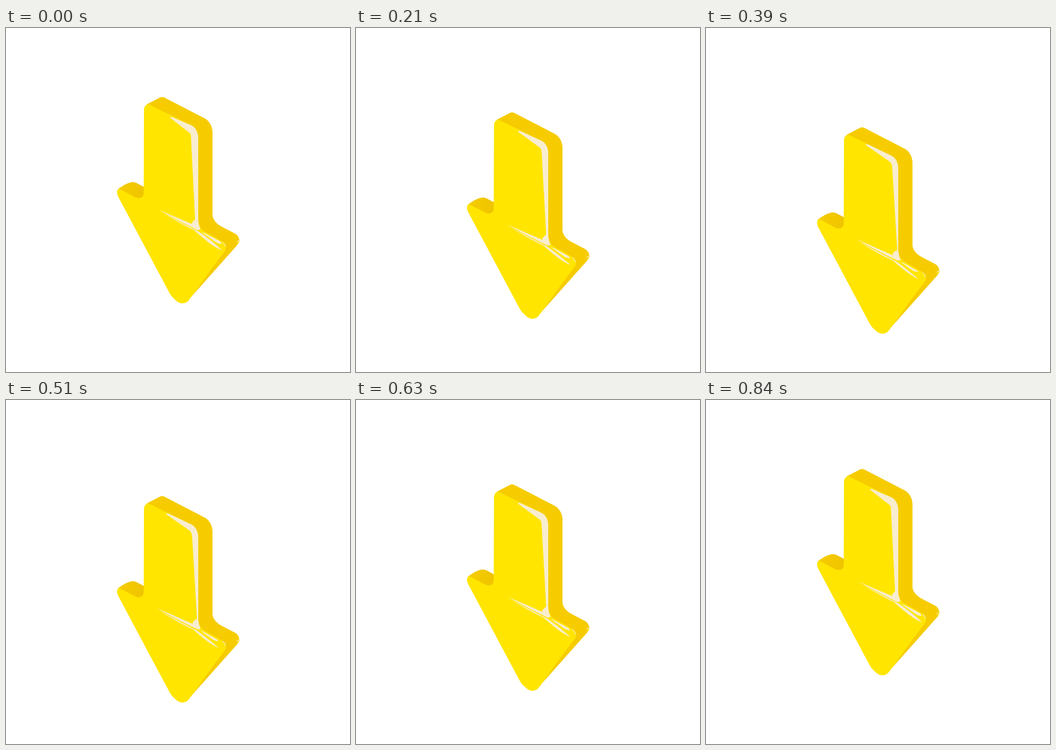
Write an HTML page that moves like this. It is 748 by 748 pixels and loops after 870 ms.

```html
<!DOCTYPE html>
<html lang="en">
<head>
<meta charset="utf-8">
<title>Bouncing arrow</title>
<style>
html, body { margin: 0; width: 100%; height: 100%; overflow: hidden; background: #fff; }
svg { display: block; width: 100vw; height: 100vh; }
.side { fill: #f6cc00; }
.face { fill: #ffe500; }
.shine { fill: #f8edcf; }
.glint { fill: none; stroke: #f8edcf; stroke-width: 1.4; stroke-linecap: round; }
</style>
</head>
<body>
<svg viewBox="0 0 748 748">
  <defs>
    <linearGradient id="wing">
      <stop offset="0" stop-color="#f6cc00"/>
      <stop offset="1" stop-color="#efc400"/>
    </linearGradient>
  </defs>
  <g id="arrow">
    <path fill="url(#wing)" d="M244 350C253 343 265 336 275 335Q280 335 284 337L301 346V372H270Z"/>
    <path class="side" d="M306 166L335 151Q340 148.500 346 152L433 197C443 203 449 215 449 227V408C451 420 461 428 471 433L498 447Q507 452 507.500 463C507 467 505 469 502 473L397 591L388 598L400 400Z"/>
    <path class="face" d="M300 180C300 171 303 167 310 166L404 212C413 217 418 228 418 238V418C419 430 424 438 431 442L468 463C478 468 481 477 476 485L446 525L399 590Q394 597 388 598C380 600 374 597 368 591C363 587 359 582 356 577L244 367C241 361 240 353 245 349L279 367C288 372 299 371 299.500 358Z"/>
    <path class="face" d="M503 466L507.400 463.500Q506.500 468 503 471Z"/>
    <path class="glint" d="M502 465Q504 462.500 506.500 463"/>
    <path class="glint" d="M471 466Q476 469 477 475"/>
    <path class="shine"
      d="M357 193L362 194L404 212C413 217 418 228 418 238L418 418Q419 429 423 437Q420 440 415 439Q370 416 331 395L404 426L406 421L411 416L411 412L402 234Q402 230 399 228L358 196Z"
      data-to="M347 187L352 187L404 212C413 217 418 228 418 238L418 418Q419 429 423 438Q420 441 415 439Q368 417 327 393L406 428L407 423L413 418L416 418L405 238Q404 229 400 225L348 189Z"/>
    <path class="shine"
      d="M424 443L432 446L466 464Q470 468 467 470L458 467Z"
      data-to="M422 442L430 445L458 461Q462 464 459 465L450 462Z"/>
    <path class="shine"
      d="M340 401Q395 431 418 442Q445 460 470 483Q461 481 444 469Q426 455 408 439Q380 426 340 401Z"
      data-to="M332 398Q388 429 413 441Q438 459 462 480Q454 477 437 465Q420 452 407 440Q375 426 332 398Z"/>
  </g>
</svg>
<script>
const LOOP = 870, STEP = 30, HALF = 420, DROP = 67;
const arrow = document.getElementById('arrow');
const number = /-?\d+(\.\d+)?/g;

const shines = [...document.querySelectorAll('[data-to]')].map(el => ({
  el,
  from: el.getAttribute('d'),
  to: el.dataset.to.match(number).map(Number)
}));

const ease = x => x * x * (3 - 2 * x);

function morph({ el, from, to }, p) {
  let i = 0;
  el.setAttribute('d', from.replace(number, n => (+n + (to[i++] - n) * p).toFixed(2)));
}

function draw(now) {
  const t = Math.floor(now % LOOP / STEP) * STEP;
  const p = ease(1 - Math.abs(t - HALF) / HALF);
  arrow.setAttribute('transform', `translate(0 ${(DROP * p).toFixed(2)})`);
  shines.forEach(s => morph(s, p));
}

let start;
function tick(now) {
  start ??= now;
  draw(now - start);
  requestAnimationFrame(tick);
}
draw(0);
requestAnimationFrame(tick);
</script>
</body>
</html>
```
